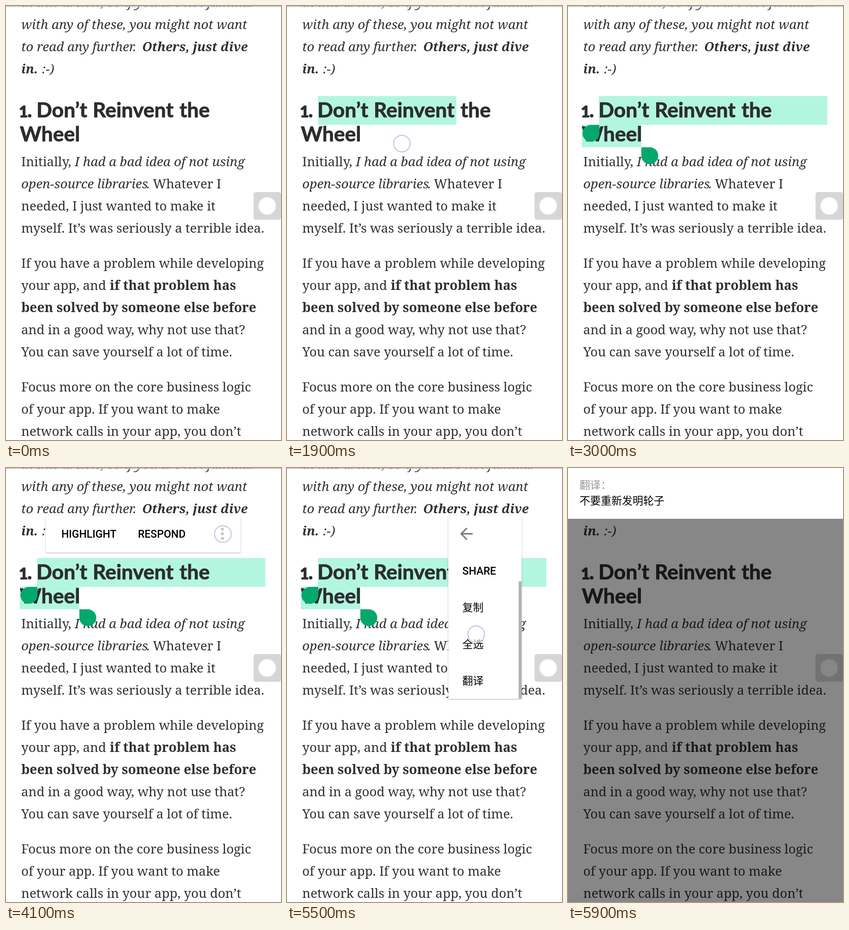
Write an HTML page that moves like this. It is 596 px wide and 940 px high and loops after 8 s.

```html
<!DOCTYPE html>
<html lang="zh-CN">
<head>
<meta charset="utf-8">
<title>Select and translate</title>
<style>
  html, body { margin: 0; width: 100%; height: 100%; overflow: hidden; background: #fff; }
  #stage { display: block; width: 596px; height: 940px; }
  text { white-space: pre; }
  .body { font: 27.75px "Noto Serif", serif; fill: #303032; }
  .i, .bi { font-style: italic; }
  .i { font-size: 28px; }
  .b, .bi { font-weight: 700; }
  .b { font-size: 28.2px; }
  .bi { font-size: 27.3px; }
  .head { font: 700 44.6px Lato, sans-serif; fill: #2d2d2f; stroke: #2d2d2f; stroke-width: .9px; }
  .small { font-size: 34px; font-weight: 900; }
  .label { font: 500 23px Roboto, "Noto Sans CJK SC", "Noto Sans CJK", sans-serif; }
  .cjk { font: 23px "Noto Sans CJK SC", "Noto Sans CJK", sans-serif; }
  #menuCard { filter: drop-shadow(0 1px 1.5px rgba(0, 0, 0, .32)); }
</style>
</head>
<body>
<svg id="stage" viewBox="0 0 596 940">
  <defs>
    <linearGradient id="shade" x2="0" y2="1">
      <stop stop-color="#a8a8a8"/>
      <stop offset="1" stop-color="#fff" stop-opacity="0"/>
    </linearGradient>
  </defs>
  <rect width="596" height="940" fill="#fff"/>
  <g fill="#b3f6e0">
    <rect id="mark1" x="67" y="195" height="62.5"/>
    <rect id="mark2" x="30" y="257" width="129" height="49"/>
  </g>
  <g id="article"></g>
  <rect width="596" height="4" fill="url(#shade)"/>

  <g id="handles" fill="#04a86c">
    <path d="M68 257.500V276a18.300 18.300 0 1 1-18.300-18.500Z"/>
    <path d="M159 306V324.300a18.300 18.300 0 1 0 18.300-18.300Z"/>
  </g>

  <g id="menu">
    <rect id="menuCard" y="103" rx="3" fill="#fff"/>
    <svg id="panel" y="103">
      <g id="mainItems">
        <text class="label" x="34" y="48">HIGHLIGHT</text>
        <text class="label" x="200" y="48">RESPOND</text>
        <g fill="#757575">
          <circle cx="383" cy="29.500" r="3.300"/>
          <circle cx="383" cy="39.500" r="3.300"/>
          <circle cx="383" cy="49.500" r="3.300"/>
        </g>
      </g>
      <g id="moreItems">
        <path d="M53 39.500H29M40.500 27 28 39.500 40.500 52" fill="none" stroke="#757575" stroke-width="3"/>
        <svg y="79" width="160" height="318">
          <g id="list"></g>
          <rect id="thumb" x="152.500" width="7" height="254" fill="#b2b2b2"/>
        </svg>
      </g>
    </svg>
  </g>

  <rect x="536.500" y="403" width="59.500" height="60" rx="5" fill="#d6d6d6"/>
  <circle cx="566" cy="433" r="19" fill="#fff" stroke="#e6e6e6" stroke-width="2"/>

  <circle id="touch" r="18" fill="#fff" fill-opacity=".6" stroke="#c5c9e6" stroke-width="2.400"/>

  <g id="result">
    <rect width="596" height="940" fill-opacity=".47"/>
    <rect width="596" height="110" fill="#fff"/>
    <text class="cjk" x="25" y="45" fill="#999">翻译：</text>
    <text class="cjk" x="25" y="79">不要重新发明轮子</text>
  </g>
</svg>
<script>
const LOOP = 8000, STEP = 100;
const $ = id => document.getElementById(id);

function set(id, attrs) {
  for (const key in attrs) $(id).setAttribute(key, attrs[key]);
}

function addText(parent, cls, x, y, text) {
  const node = document.createElementNS("http://www.w3.org/2000/svg", "text");
  node.setAttribute("class", cls);
  node.setAttribute("x", x);
  node.setAttribute("y", y);
  node.textContent = text;
  $(parent).append(node);
}

// Each line: baseline, then runs of [style, x, text].
const lines = [
  [2, ["i", 33, "in this article, so if you are not familiar"]],
  [50, ["i", 33, "with any of these, you might not want"]],
  [98, ["i", 33, "to read any further."], ["bi", 295, "Others, just dive"]],
  [146, ["bi", 33, "in."], ["i", 78, ":-)"]],
  [347, ["", 33, "Initially,"], ["i", 149, "I had a bad idea of not using"]],
  [395, ["i", 33, "open-source libraries"], ["", 304, ". Whatever I"]],
  [443, ["", 33, "needed, I just wanted to make it"]],
  [491, ["", 33, "myself. It’s was seriously a terrible idea."]],
  [567, ["", 33, "If you have a problem while developing"]],
  [615, ["", 33, "your app, and"], ["b", 225, "if that problem has"]],
  [663, ["b", 33, "been solved by someone else before"]],
  [711, ["", 33, "and in a good way, why not use that?"]],
  [759, ["", 33, "You can save yourself a lot of time."]],
  [835, ["", 33, "Focus more on the core business logic"]],
  [883, ["", 33, "of your app. If you want to make"]],
  [931, ["", 33, "network calls in your app, you don’t"]],
];
for (const [y, ...runs] of lines)
  for (const [style, x, text] of runs) addText("article", "body " + style, x, y, text);

addText("article", "head small", 28, 241, "1");
addText("article", "head", 46, 241, ".");
addText("article", "head", 66, 241, "Don’t");
addText("article", "head", 188, 241, "Reinvent");
addText("article", "head", 376, 241, "the");
addText("article", "head", 30, 293, "Wheel");

["TWEET", "SHARE", "复制", "全选", "翻译"].forEach((text, i) =>
  addText("list", i < 2 ? "label" : "cjk", 30.5, 49 + i * 79.4, text));

// Linear interpolation through [time, value] points.
function track(t, points) {
  let [t0, v0] = points[0];
  for (const [t1, v1] of points) {
    if (t < t1) return t1 > t0 ? v0 + (v1 - v0) * (t - t0) / (t1 - t0) : v0;
    [t0, v0] = [t1, v1];
  }
  return v0;
}

const ease = p => p * p * (3 - 2 * p);
const clamp = v => Math.max(0, Math.min(1, v));
const show = (id, on) => set(id, { opacity: +on });

function drawSelection(t) {
  const on = t >= 1100 && t < 5700;
  set("mark1", { width: t < 1700 ? 113 : t < 2200 ? 300 : 495 });
  show("mark1", on);
  show("mark2", on && t >= 2200);
  show("handles", t >= 3000 && t < 5700);
}

function drawTouch(t) {
  let x, y, opacity;
  if (t < 3000) {
    x = track(t, [[1200, 73], [1900, 249], [2100, 251]]);
    y = track(t, [[1200, 241], [1900, 298], [2100, 331], [2400, 344]]);
    opacity = t < 500 ? 0 : track(t, [[2500, 1], [2800, 0]]);
  } else if (t < 5000) {
    [x, y] = [470, 143];
    opacity = t < 3900 ? 0 : track(t, [[4100, 1], [4400, 0]]);
  } else {
    [x, y] = [410, track(t, [[5200, 460], [5300, 440], [5500, 360]])];
    opacity = t < 5300 ? 0 : track(t, [[5500, 1], [5700, 0]]);
  }
  set("touch", { cx: x, cy: y, opacity });
}

function drawMenu(t) {
  const open = ease(track(t, [[4100, 0], [4500, 1]]));
  const x = 86 + 263.5 * open, width = 508.5 - x, height = 80 + 317 * open;
  const scroll = 79.4 * ease(track(t, [[5200, 0], [5500, 1]]));
  set("menu", { opacity: track(t, [[3000, 0], [3200, 1], [5600, 1], [5700, 0]]) });
  set("menuCard", { x, width, height });
  set("panel", { x, width, height });
  set("mainItems", { transform: `translate(${86 - x})`, opacity: clamp(1 - open * 3) });
  set("moreItems", { opacity: clamp(open * 2 - 1) });
  set("list", { transform: `translate(0 ${-scroll})` });
  set("thumb", { y: scroll * .8 });
}

function draw(now) {
  const t = Math.floor(now % LOOP / STEP) * STEP;
  drawSelection(t);
  drawTouch(t);
  drawMenu(t);
  show("result", t >= 5900);
}

const start = performance.now();
function tick() {
  draw(performance.now() - start);
  requestAnimationFrame(tick);
}
tick();
</script>
</body>
</html>
```
